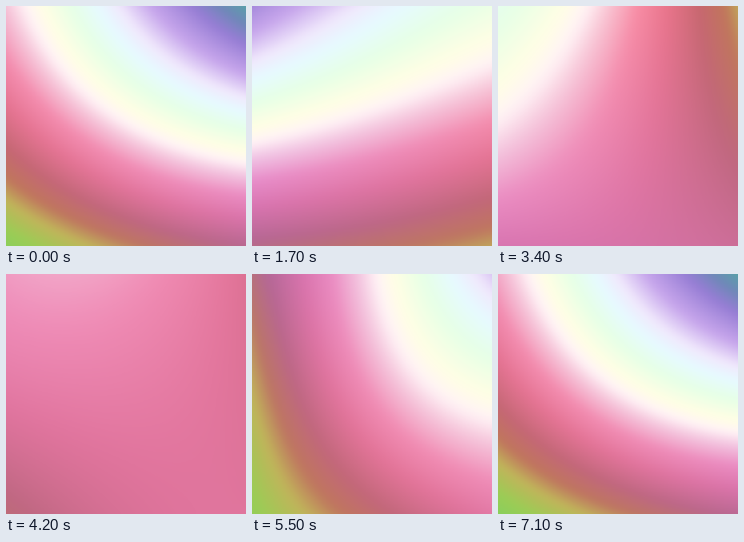
These frames come from a looping animation (300x300 px, 7200 ms). An HTML page with a canvas:

```html
<!DOCTYPE html>
<html lang="en">
<head>
<meta charset="utf-8">
<title>Drifting gradient</title>
<style>
  html, body { margin: 0; width: 100%; height: 100%; overflow: hidden; background: #f4a0c0; }
  canvas { display: block; width: 300px; height: 300px; }
</style>
</head>
<body>
<canvas id="stage" width="300" height="300"></canvas>
<script>
const SIZE = 300, LOOP = 7200, STEP = 100;

// Level, colour, and how strongly the violet tint applies there.
const STOPS = [
  [-3.8, '#82d05f', 0], [-3.3, '#9bcc55', 0], [-2.85, '#c0b45a', 0],
  [-2.5, '#c0765c', 0.4], [-2.1, '#c66770', 1], [-1.6, '#e8748c', 1],
  [-1.2, '#f78ca5', 1], [-0.85, '#f8c3d2', 0.5], [-0.6, '#fff3f6', 0],
  [-0.38, '#fffee4', 0], [0, '#e6ffe6', 0], [0.35, '#e6faff', 0],
  [0.65, '#f0e8fc', 0], [1.1, '#c6a5eb', 0], [1.7, '#967dd4', 0],
  [2.1, '#7087b9', 0], [2.6, '#55a5a5', 0]
].map(([u, hex, tint]) => [u, ...[1, 3, 5].map(i => parseInt(hex.slice(i, i + 2), 16)), tint]);

// Poses: time, 3x3 grid of levels (row by row), tint at the four corners.
const POSES = [
  [0,    [-0.85, 0.75, 2.5,  -1.85, -0.65, 0.1,   -3.6, -2.6, -2.1],    [0.35, 0.5, -0.1, 0.9]],
  [800,  [0.6, 1, 1.5,       -0.95, -0.6, -0.25,  -2.8, -2.75, -2.65],  [0.4, 0.7, 0.35, 0.8]],
  [1700, [1.5, 0.55, -0.1,   -0.35, -0.8, -1.25,  -2.2, -2.4, -2.75],   [1, 0.2, 1, 0.25]],
  [3400, [0.1, -0.95, -2.75, -0.65, -1.35, -2.25, -1.6, -1.65, -1.85],  [0, -0.05, 1, 0.7]],
  [4900, [-2.05, -1, -0.2,   -2.35, -1.4, -0.9,   -2.95, -1.95, -1.5],  [1.1, 0.6, 0, 0.3]],
  [6200, [-2.2, -0.1, 1.95,  -3.05, -0.85, 0.15,  -3.8, -2.6, -1.65],   [1, -0.4, -0.1, 0.95]]
].map(([t, level, tint]) => ({ t, v: [...level, ...tint] }));

const clamp = (v, lo, hi) => Math.min(hi, Math.max(lo, v));

function colorAt(u) {
  u = clamp(u, STOPS[0][0], STOPS[STOPS.length - 1][0]);
  let i = 1;
  while (STOPS[i][0] < u) i++;
  const a = STOPS[i - 1], b = STOPS[i], k = (u - a[0]) / (b[0] - a[0]);
  return [1, 2, 3, 4].map(c => a[c] + (b[c] - a[c]) * k);
}

// Palette table, softened a little so no stop shows as a crease.
const LOW = -4.2, HIGH = 3, RES = 250;
const table = new Float32Array(((HIGH - LOW) * RES + 1) * 4);
for (let i = 0; i < table.length / 4; i++) {
  for (let j = -3; j <= 3; j++) {
    colorAt(LOW + i / RES + j * 0.025).forEach((v, c) => { table[i * 4 + c] += v / 7; });
  }
}

// Periodic cubic through the poses.
function poseAt(time) {
  const n = POSES.length;
  const at = i => {
    const turn = Math.floor(i / n), p = POSES[i - turn * n];
    return { t: p.t + turn * LOOP, v: p.v };
  };
  let i = n - 1;
  while (POSES[i].t > time) i--;
  const [p, a, b, q] = [at(i - 1), at(i), at(i + 1), at(i + 2)];
  const d = b.t - a.t, s = (time - a.t) / d, s2 = s * s, s3 = s2 * s;
  return a.v.map((va, c) => {
    const vb = b.v[c];
    const ma = (vb - p.v[c]) / (b.t - p.t) * d;
    const mb = (q.v[c] - va) / (q.t - a.t) * d;
    return (2 * s3 - 3 * s2 + 1) * va + (s3 - 2 * s2 + s) * ma
         + (3 * s2 - 2 * s3) * vb + (s3 - s2) * mb;
  });
}

const ctx = document.getElementById('stage').getContext('2d');
const image = ctx.createImageData(SIZE, SIZE);

// Coefficients of the parabola through three evenly spaced values.
const parabola = (a, m, b) => [a, 4 * m - 3 * a - b, 2 * (a + b) - 4 * m];

function draw(time) {
  const v = poseAt(time), px = image.data;
  const cols = [0, 1, 2].map(c => parabola(v[c], v[c + 3], v[c + 6]));
  let o = 0;
  for (let j = 0; j < SIZE; j++) {
    const y = (j + 0.5) / SIZE;
    const [k0, k1, k2] = parabola(...cols.map(([a, b, c]) => a + (b + c * y) * y));
    const left = v[9] + (v[11] - v[9]) * y, right = v[10] + (v[12] - v[10]) * y;
    for (let i = 0; i < SIZE; i++) {
      const x = (i + 0.5) / SIZE;
      const u = clamp(k0 + (k1 + k2 * x) * x, LOW, HIGH);
      const e = Math.round((u - LOW) * RES) * 4;
      const tint = clamp(left + (right - left) * x, -0.1, 1.1) * table[e + 3];
      px[o++] = table[e] - 16 * tint;
      px[o++] = table[e + 1];
      px[o++] = table[e + 2] + 36 * tint;
      px[o++] = 255;
    }
  }
  ctx.putImageData(image, 0, 0);
}

const start = performance.now();
let shown = -1;
function tick() {
  const step = Math.floor((performance.now() - start) % LOOP / STEP);
  if (step !== shown) draw((shown = step) * STEP);
  requestAnimationFrame(tick);
}
tick();
</script>
</body>
</html>
```
